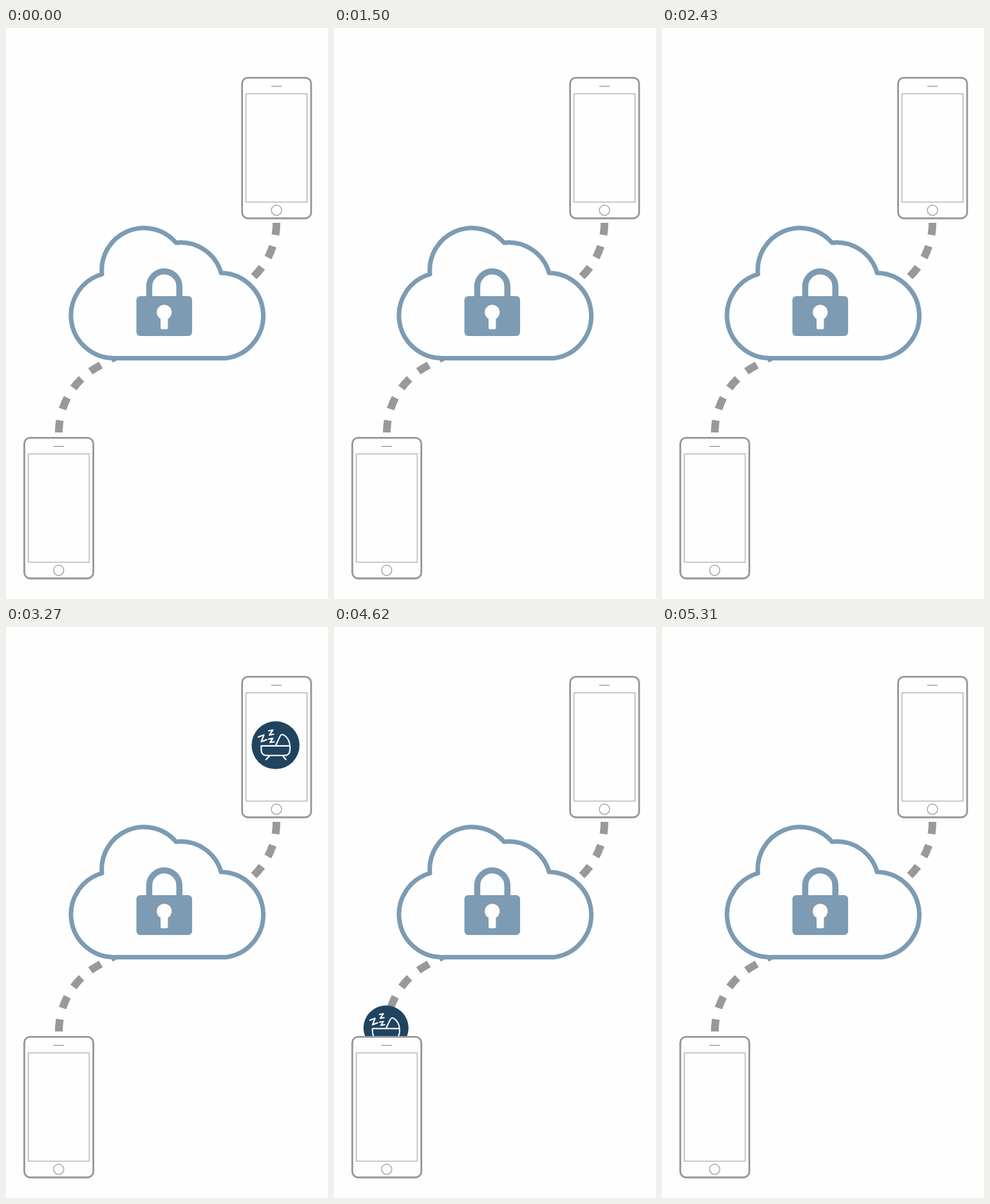
Animation of 500 by 888 pixels, one loop 5400 ms. Source, as an HTML page:

```html
<!DOCTYPE html>
<html lang="en">
<head>
<meta charset="utf-8">
<title>Secure sync</title>
<style>
  html, body { margin: 0; height: 100%; overflow: hidden; background: #fefefe; }
  svg { display: block; width: 100%; height: 100%; }
  .line { fill: none; stroke: #fff; stroke-width: 2; stroke-linecap: round; stroke-linejoin: round; }
</style>
</head>
<body>
<svg viewBox="0 0 500 888">
  <defs>
    <g id="phone" fill="none" stroke="#979797">
      <path fill="#fefefe" fill-rule="evenodd" stroke="none"
        d="M37.5 637.5h89a9 9 0 0 1 9 9v200a9 9 0 0 1-9 9h-89a9 9 0 0 1-9-9v-200a9 9 0 0 1 9-9zM34.5 662.3v168.5h94.7v-168.5z"/>
      <rect x="28.4" y="637.4" width="107.2" height="218.6" rx="9" stroke-width="2.8"/>
      <rect x="34.5" y="662.3" width="94.7" height="168.5"/>
      <path d="M73.5 650.6h16.5" stroke-width="1.3"/>
      <circle cx="81.8" cy="843.3" r="8" stroke-width="1.2"/>
    </g>
  </defs>

  <g fill="none" stroke="#999" stroke-width="12" stroke-dasharray="19 18">
    <path d="M82 629A116.5 116.5 0 0 1 141.1 527.6L251 466"/>
    <path d="M420 303A116.5 116.5 0 0 1 360.9 404.4L251 466"/>
  </g>
  <path id="route" fill="none"
    d="M82 742V629A116.5 116.5 0 0 1 141.1 527.6L360.9 404.4A116.5 116.5 0 0 0 420 303V183"/>

  <g id="bottle">
    <circle r="35" fill="#94a996"/>
    <path class="line" d="M-6 -14C-6 -18 -3 -18 -3 -21C-3 -26 4 -26 4 -21C4 -18 7 -18 7 -14
      M-7.5 -14H8.5Q10 -14 10 -12V-9.5Q10 -8 8.5 -8H-7.5Q-9 -8 -9 -9.5V-12Q-9 -14 -7.5 -14Z
      M-7.5 -8Q-7.5 -5.5 -9 -4Q-10 -3 -10 -1V19Q-10 22 -7 22H8Q11 22 11 19V-1Q11 -3 10 -4Q8.5 -5.5 8.5 -8
      M-10 1H-4M-10 6H-6M-10 11H-4"/>
  </g>
  <g id="crib">
    <circle r="35" fill="#204460"/>
    <path class="line" d="M-21 1H21V6Q21 15 13 15H-13Q-21 15 -21 6Z
      M0 1L6 -12Q8 -17 12 -15Q20 -10 21 1M-9 16l-5 5M11 16l4 5
      M-25 -12l8 -3l-4 10l8 -3M-10 -21l6 -1l-5 7l6 -1M-10 -9l6 -1l-4 6l6 -1"/>
  </g>

  <use href="#phone"/>
  <use href="#phone" x="338.2" y="-560"/>

  <path fill="#fefefe" stroke="#7d9bb2" stroke-width="7" stroke-linejoin="round"
    d="M166.5 513.4A66.5 66.5 0 0 1 149 383A65.5 65.5 0 0 1 264 334A65 65 0 0 1 334 381A66.55 66.55 0 0 1 342.5 513.4Z"/>
  <path fill="none" stroke="#7d9bb2" stroke-width="9.5" d="M222.4 420V402a23.4 23.4 0 0 1 46.8 0V420"/>
  <rect x="202.5" y="417" width="86.5" height="62" rx="6" fill="#7d9bb2"/>
  <circle cx="245.7" cy="442" r="11.6" fill="#fefefe"/>
  <rect x="240" y="446" width="11.4" height="22.5" rx="2" fill="#fefefe"/>
</svg>
<script>
const LOOP = 5400, STEP = 30;
const route = document.getElementById('route');
const length = route.getTotalLength();

const trips = [
  { id: 'bottle', show: 330, go: 915, arrive: 2115, hide: 2190, dx: 0.3, dy: 0 },
  { id: 'crib', show: 3000, go: 3495, arrive: 5025, hide: 5070, dx: -1.4, dy: 0.8, back: true }
];
for (const trip of trips) trip.icon = document.getElementById(trip.id);

const progress = (t, from, to) => Math.min(1, Math.max(0, (t - from) / (to - from)));
const sineInOut = p => (1 - Math.cos(Math.PI * p)) / 2;
const backIn = p => p * p * (2.7 * p - 1.7);
const backOut = p => 1 - backIn(1 - p);

function place(trip, t) {
  const p = sineInOut(progress(t, trip.go, trip.arrive));
  const at = route.getPointAtLength(length * (trip.back ? 1 - p : p));
  const scale = t < trip.hide
    ? backOut(progress(t, trip.show, trip.show + 360))
    : 1 - backIn(progress(t, trip.hide, trip.hide + 240));
  trip.icon.setAttribute('visibility', scale > 0.001 ? 'visible' : 'hidden');
  trip.icon.setAttribute('transform',
    `translate(${at.x + trip.dx} ${at.y + trip.dy}) scale(${scale})`);
}

const start = performance.now();
function draw(now) {
  const t = Math.floor(Math.max(0, now - start) % LOOP / STEP) * STEP;
  for (const trip of trips) place(trip, t);
  requestAnimationFrame(draw);
}
draw(start);
</script>
</body>
</html>
```
